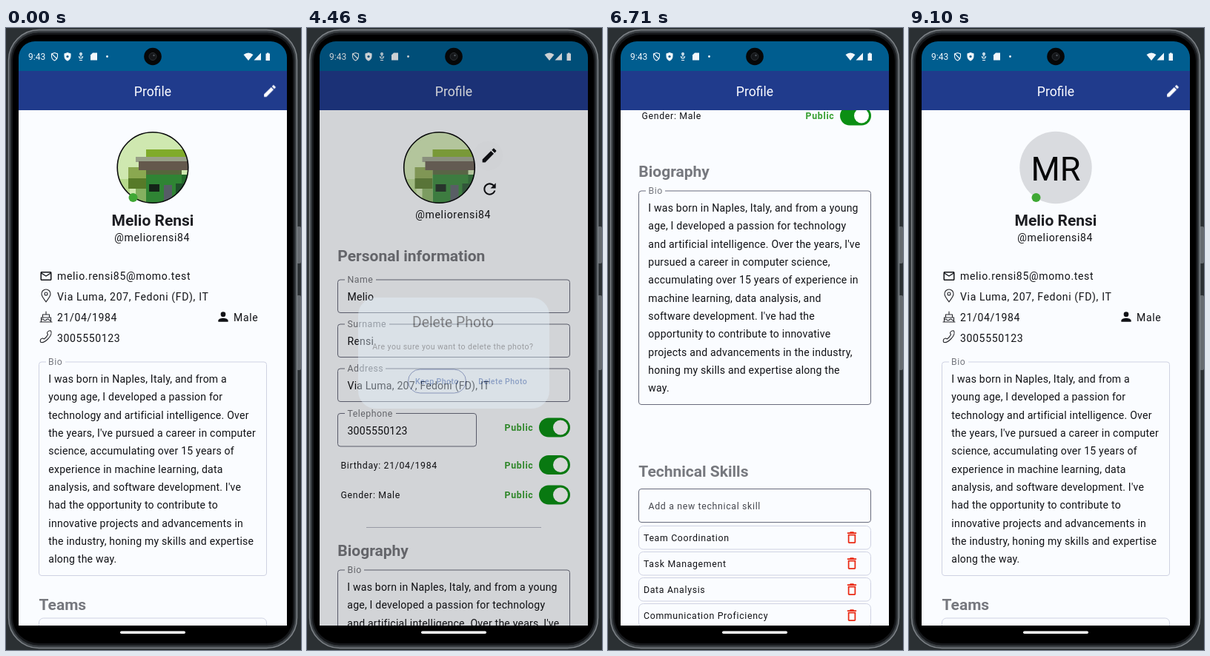
These frames come from a looping animation (398 px wide and 840 px high, 9140 ms). An HTML page:

```html
<!DOCTYPE html>
<html lang="en">
<head>
<meta charset="utf-8">
<title>Profile</title>
<style>
html, body { margin: 0; width: 398px; height: 840px; overflow: hidden; background: #2b3033; }
svg { display: block; }
text { font-family: Roboto, sans-serif; fill: #111216; white-space: pre; }
.info { font-size: 14.06px; letter-spacing: .64px; }
.body { font-size: 14.06px; letter-spacing: .22px; }
.small { font-size: 12.3px; letter-spacing: .68px; }
.label { font-size: 12.3px; letter-spacing: .5px; fill: #75777e; }
.state { font-size: 12.3px; letter-spacing: .72px; font-weight: 700; fill: #369f30; }
.head { font-size: 21px; font-weight: 700; fill: #76787e; }
.note { font-size: 10.55px; letter-spacing: .44px; }
.chip { font-size: 9.67px; letter-spacing: .43px; }
.mid { font-weight: 500; }
.hint { fill: #45474e; }
.line { fill: none; stroke: #686b7c; }
.pale { fill: none; stroke: #cfd2e2; }
</style>
</head>
<body>
<svg id="stage" width="398" height="840" viewBox="0 0 398 840"></svg>
<script>
const LOOP = 9140;
const PAPER = '#fafcff';
const NAVY = '#203b8c';
const RED = '#ea2a14';

const ICONS = {
  pencil: 'M3 17.25V21h3.75L17.81 9.94l-3.75-3.75L3 17.25zM20.71 7.04c.39-.39.39-1.02 0-1.41l-2.34-2.34c-.39-.39-1.02-.39-1.41 0l-1.83 1.83 3.75 3.75 1.83-1.83z',
  reset: 'M17.65 6.35C16.2 4.9 14.21 4 12 4c-4.42 0-7.99 3.58-7.99 8s3.57 8 7.99 8c3.73 0 6.84-2.55 7.73-6h-2.08c-.82 2.33-3.04 4-5.65 4-3.31 0-6-2.69-6-6s2.69-6 6-6c1.66 0 3.14.69 4.22 1.78L13 11h7V4z',
  bin: 'M6 19c0 1.1.9 2 2 2h8c1.1 0 2-.9 2-2V7H6v12zM8 9h8v10H8V9zM15.5 4l-1-1h-5l-1 1H5v2h14V4z',
  eye: 'M12 4.5C7 4.5 2.73 7.61 1 12c1.73 4.39 6 7.5 11 7.5s9.27-3.11 11-7.5c-1.73-4.39-6-7.5-11-7.5zM12 17a5 5 0 1 1 0-10 5 5 0 0 1 0 10zm0-8a3 3 0 1 0 0 6 3 3 0 0 0 0-6z',
  person: 'M12 12a4 4 0 1 0 0-8 4 4 0 0 0 0 8zm0 2c-2.67 0-8 1.34-8 4v2h16v-2c0-2.66-5.33-4-8-4z',
  mail: 'M22 6c0-1.1-.9-2-2-2H4c-1.1 0-2 .9-2 2v12c0 1.1.9 2 2 2h16c1.1 0 2-.9 2-2V6zm-2 0l-8 5-8-5h16zm0 12H4V8l8 5 8-5v10z'
};

const text = (x, y, cls, str, more = '') => `<text x="${x}" y="${y}" class="${cls}" ${more}>${str}</text>`;
const rect = (x, y, w, h, fill, r = 0, more = '') => `<rect x="${x}" y="${y}" width="${w}" height="${h}" rx="${r}" fill="${fill}" ${more}/>`;
const box = (x, y, w, h, cls, r) => `<rect x="${x}" y="${y}" width="${w}" height="${h}" rx="${r}" class="${cls}"/>`;
const dot = (x, y, r, fill, more = '') => `<circle cx="${x}" cy="${y}" r="${r}" fill="${fill}" ${more}/>`;
const icon = (name, cx, cy, size, fill = '#111216') =>
  `<path d="${ICONS[name]}" fill="${fill}" transform="translate(${cx - size / 2} ${cy - size / 2}) scale(${size / 24})"/>`;
const lines = (x, y, rows) => rows.map((row, i) => text(x, y + i * 24.33, 'body', row)).join('');

// Outlined field whose label sits on the top edge
const field = (y, label, gap, value, w = 314, cls = 'body') =>
  box(41.5, y, w - 1, 44.5, 'line', 3.5) + rect(51, y - 2, gap, 4, PAPER) +
  text(54.5, y + 4.3, 'label', label) + text(54.5, y + (cls === 'body' ? 28 : 26.5), cls, value);
const blank = (y, hint) => box(41.5, y, 313, 45, 'line', 3.5) + text(54.5, y + 27.5, 'small hint', hint);
const toggle = (y, label = 'Public') =>
  text(266.5, y + 4.7, 'state', label) + rect(313, y - 13, 42, 26, '#0b8f14', 13) + dot(342, y, 10, '#fff');
const skill = (y, name) =>
  box(41.5, y, 313, 31.5, 'pale', 6) + text(48, y + 20.5, 'small', name) + icon('bin', 329, y + 15.7, 21, RED);
const language = (y, name, level, chipX) =>
  box(41.5, y - 18, 313, 36, 'pale', 6) + text(48, y + 4.5, 'small', name) +
  rect(chipX + .5, y - 9.5, 309 - chipX, 19, '#dadcf2', 7, 'stroke="#4a4c58"') +
  text(chipX + 7, y + 3.5, 'chip', level) + icon('bin', 329, y, 21, RED);

const picture = (cx, fade) => `<g transform="translate(${cx - 198} 0)">
  <g clip-path="url(#round)" opacity="${fade}">` +
  rect(149, 140, 98, 98, '#cfe8b0') +
  rect(149, 204, 18, 34, '#b6d98c') +
  rect(189, 164, 58, 11, '#80ab2a') + rect(175, 174, 72, 7, '#98a088') +
  rect(165, 188, 24, 15, '#8aa850') + rect(165, 203, 24, 14, '#567a28') + rect(179, 180, 68, 12, '#64584c') +
  rect(189, 192, 48, 6, '#56663c') + rect(189, 198, 58, 40, '#2f8434') +
  rect(175, 217, 14, 21, '#84b060') + rect(237, 198, 10, 18, '#246a2c') +
  rect(193, 211, 14, 10, '#142418') + rect(213, 212, 11, 22, '#565c66') + rect(229, 210, 12, 14, '#20502c') +
  `</g><circle cx="198" cy="188.5" r="47.8" fill="none" stroke="#0a0b0d" stroke-width="1.6"/></g>`;
const monogram = (cx, ink) => dot(cx, 188.5, 48.7, '#d9dbdf') +
  text(cx, 206.3, '', 'MR', `text-anchor="middle" font-size="45" style="fill:${ink}"`);

const thin = d => `<path d="${d}" fill="none" stroke="#26272c" stroke-width="1.1" stroke-linejoin="round" stroke-linecap="round"/>`;

const view = `<g class="view">
  <g class="pic">${picture(198, 1)}</g><g class="mono">${monogram(198, '#060708')}</g>` +
  dot(171.5, 229, 6, '#3fa834') +
  text(198, 267, 'head', 'Melio Rensi', 'text-anchor="middle" style="fill:#1c1d22"') +
  text(146.3, 288, 'info', '@meliorensi84') +
  icon('mail', 54, 335, 18) +
  thin('M54 370c-3-5-6-7-6-11a6 6 0 0 1 12 0c0 4-3 6-6 11z') + thin('M52 359a2 2 0 1 1 4 0a2 2 0 1 1-4 0') +
  thin('M46 397h16M47.500 397v-6h13v6M49.500 391v-4h9v4M54 387v-4M47.500 394q2 -2 3.500 0t3.500 0t3.500 0t2.500 0') +
  thin('M46.500 424c-1-3 1-5 3-5l2 1c3-2 4-4 5-6l-1-2c0-2 3-4 5-3c2 4-1 8-4 11s-7 6-10 4z') +
  text(69, 340, 'info', 'melio.rensi85@momo.test') +
  text(69, 368, 'info', 'Via Luma, 207, Fedoni (FD), IT') +
  text(69, 396, 'info', '21/04/1984') + icon('person', 293, 390, 20) + text(307, 396, 'info', 'Male') +
  text(69, 423.5, 'info', '3005550123') +
  box(44.5, 451, 307, 288.5, 'pale', 3.5) + rect(54, 449, 26, 4, PAPER) + text(57, 455.3, 'label', 'Bio') +
  lines(57.3, 479, [
    'I was born in Naples, Italy, and from a', 'young age, I developed a passion for',
    'technology and artificial intelligence. Over', "the years, I've pursued a career in computer",
    'science, accumulating over 15 years of', 'experience in machine learning, data',
    "analysis, and software development. I've", 'had the opportunity to contribute to',
    'innovative projects and advancements in', 'the industry, honing my skills and expertise',
    'along the way.']) +
  text(44.5, 786, 'head', 'Teams') + box(44.5, 797, 307, 60, 'pale', 6) + '</g>';

const languages = [
  [95, 'Italian', 'Native (C2)', 238], [134, 'English', 'Upper-Intermediate (B2)', 183],
  [173, 'French', 'Elementary (A2)', 221], [212, 'German', 'Upper-Intermediate (B2)', 183],
  [251, 'Spanish', 'Upper-Intermediate (B2)', 183]];
const skills = ['Team Coordination', 'Task Management', 'Data Analysis', 'Communication Proficiency', 'Machine Learning'];

const edit = `<g class="edit"><g id="scroll">
  <g class="pic">${picture(178.5, .88)}` + dot(244.5, 172.5, 20, '#000', 'id="tapPhoto"') +
  icon('pencil', 246, 172, 25) + icon('reset', 246.5, 217.5, 24.5) + '</g>' +
  `<g class="mono">${monogram(178.5, '#b4b6ba')}${icon('pencil', 246, 217.5, 25)}</g>` +
  text(146.3, 257, 'info', '@meliorensi84') +
  text(41.3, 315, 'head', 'Personal information') +
  field(340, 'Name', 42, 'Melio') + field(400, 'Surname', 60, 'Rensi') +
  field(460, 'Address', 55, 'Via Luma, 207, Fedoni (FD), IT') +
  field(520.5, 'Telephone', 69, '3005550123', 188) + toggle(539.5) +
  text(45.5, 595, 'small', 'Birthday: 21/04/1984') + toggle(590) +
  text(45.5, 635.3, 'small', 'Gender: Male') + toggle(630.5) +
  rect(80, 674, 236, 1, '#b4b7c4', 0, 'id="rule"') +
  text(41.3, 713, 'head', 'Biography') +
  box(41.5, 732, 313, 288.5, 'line', 3.5) + rect(51, 730, 26, 4, PAPER) + text(54.5, 736.3, 'label', 'Bio') +
  lines(54.3, 760, [
    'I was born in Naples, Italy, and from a young', 'age, I developed a passion for technology',
    "and artificial intelligence. Over the years, I've", 'pursued a career in computer science,',
    'accumulating over 15 years of experience in', 'machine learning, data analysis, and',
    "software development. I've had the", 'opportunity to contribute to innovative',
    'projects and advancements in the industry,', 'honing my skills and expertise along the', 'way.']) +
  text(41.3, 1118, 'head', 'Technical Skills') + blank(1134.5, 'Add a new technical skill') +
  skills.map((name, i) => skill(1184.5 + 35 * i, name)).join('') +
  '<g transform="translate(0 1446)">' +
  text(41.3, 10, 'head', 'Languages') + blank(27, 'Add a new language') +
  languages.map(row => language(...row)).join('') +
  rect(80, 311, 236, 1, '#d3d5de') +
  text(41.3, 366, 'head', 'Account') +
  field(391, 'Mail', 33, 'melio.rensi85@momo.test', 188, 'note') + toggle(410) +
  ['Old', 'New', 'Repeat'].map((word, i) =>
    blank(450.5 + 60.2 * i, word + ' password') + icon('eye', 335.5, 473.3 + 60.2 * i, 16.5, '#3a3c44')).join('') +
  text(45.5, 656, 'small', 'Status') + toggle(651.3, 'Online') +
  rect(122.5, 724.5, 74, 31.5, 'none', 15.7, `stroke="${NAVY}"`) + text(141.5, 744.5, 'note mid', 'Cancel') +
  rect(209.5, 724, 64.5, 32, NAVY, 16) + rect(209.5, 724, 64.5, 32, '#fff', 16, 'id="tapSave"') +
  text(229, 744.5, 'note mid', 'Save', 'style="fill:#fff"') +
  '</g></g></g>';

const shield = 'M65.500 33.500l4 1.500v3c0 3-2 5-4 6c-2-1-4-3-4-6v-3z';
const SKY = '#005d8f';
const status = text(30, 43, '', '9:43', 'font-size="12" style="fill:#f2f7fb"') +
  `<g stroke="#f2f7fb" stroke-width="1.1" fill="none"><path d="${shield}M62 35l7 7"/>
  <path d="${shield}" transform="translate(17.5 0)" fill="#f2f7fb"/>
  <path d="M101 34v5M98.500 38q0 3 2.500 3t2.500-3M99 43.500h4"/><circle cx="101" cy="35" r="1.4"/></g>` +
  dot(83, 38.5, 1.6, SKY) +
  '<path d="M117 33.500h6v10h-9v-7z" fill="#f2f7fb"/>' + dot(136.5, 38.5, 1.4, '#f2f7fb') +
  '<path d="M320.500 36q6.500-5 13 0l-6.500 8zM344 33.500v10h-9.500zM350.500 34.500h1.500v-1h2.500v1h1.500v9.500h-5.500z" fill="#f2f7fb"/>';

const BLUE = '#2450a8';
const dialog = '<g id="dialog">' + rect(69, 364, 258, 150, '#e2f1fd', 24) +
  text(142, 404, '', 'Delete Photo', 'font-size="19.3"') +
  text(88.3, 434, 'note hint', 'Are you sure you want to delete the photo?') +
  rect(136.5, 461, 78, 32, 'none', 16, `stroke="${NAVY}"`) +
  rect(222, 461, 85, 32, BLUE, 16, 'id="tapDelete"') +
  ['Keep', 'Delete'].map((word, i) => text(146 + 85.3 * i, 481, 'note mid', word + ' Photo', `style="fill:${BLUE}"`)).join('') + '</g>';

stage.innerHTML = `<defs>
  <clipPath id="round"><circle cx="198" cy="188.5" r="48"/></clipPath>
  <clipPath id="page"><rect x="17" y="111" width="362" height="696"/></clipPath>
  <clipPath id="screen"><path d="M17 807V40a22 22 0 0 1 22-22H357a22 22 0 0 1 22 22V807z"/></clipPath></defs>` +
  rect(392, 268, 6, 50, '#666b70', 2) + rect(392, 361, 6, 101, '#666b70', 2) +
  rect(3.5, 2.5, 389, 835, '#3d4246', 41, 'stroke="#7d8287" stroke-width="1.5"') +
  rect(6.5, 6, 383, 828, '#15171a', 37, 'stroke="#2c3034"') + rect(9, 9, 378, 822, '#000', 35) +
  '<g clip-path="url(#screen)">' +
  rect(17, 18, 362, 41, SKY) + rect(17, 58, 362, 53, NAVY) + rect(17, 111, 362, 696, PAPER) + status +
  text(198, 92, '', 'Profile', 'text-anchor="middle" font-size="17.6" style="fill:#fafbff"') +
  dot(356, 85, 18, '#fff', 'id="tapEdit"') + `<g class="view">${icon('pencil', 356, 85, 21, '#fff')}</g>` +
  `<g clip-path="url(#page)">${view}${edit}</g>` +
  rect(17, 18, 362, 789, '#000', 0, 'id="scrim"') + dialog + '</g>' +
  dot(198, 38.5, 11.8, '#060708') + dot(198, 38.5, 5, '#15171a', 'stroke="#2c3034"') + dot(199.5, 37, 1.2, '#50565c') +
  rect(154, 814.5, 88, 3.4, '#fff', 1.7);

// Each stop is [ms, value, easing to the next stop]
let css = '';
let count = 0;
function key(sel, prop, stops) {
  const name = 'k' + count++;
  const all = [[0, stops[0][1]], ...stops, [LOOP, stops[stops.length - 1][1]]];
  css += `@keyframes ${name}{` + all.map(([ms, value, ease = 'linear']) =>
    `${(ms / LOOP * 100).toFixed(3)}%{${prop}:${value};animation-timing-function:${ease}}`).join('') + '}' +
    `${sel}{animation:${name} ${LOOP}ms linear infinite}`;
}
const STD = 'cubic-bezier(.4,0,.2,1)';
const FLING = 'cubic-bezier(.3,.2,.3,1)';
const fade = (a, b) => [[200, a, STD], [900, b], [8370, b, STD], [9070, a]];
const up = px => `translateY(${-px}px)`;

key('.view', 'opacity', fade(1, 0));
key('.edit', 'opacity', fade(0, 1));
key('.pic', 'opacity', [[5599, 1], [5600, 0]]);
key('.mono', 'opacity', [[5599, 0], [5600, 1]]);
key('#tapEdit', 'opacity', [[50, 0], [150, .16], [250, .16], [450, 0]]);
key('#tapPhoto', 'opacity', [[3770, 0], [4000, .1], [4370, .1], [4470, 0]]);
key('#tapDelete', 'opacity', [[5380, 0], [5460, .12], [5700, 0]]);
key('#tapSave', 'opacity', [[8140, 0], [8230, .16], [8370, .16], [8600, 0]]);
key('#dialog', 'opacity', [[4370, 0], [4590, 1], [5500, 1], [5700, 0]]);
key('#scrim', 'opacity', [[4370, 0], [4590, .38], [5500, .38], [5700, 0]]);
key('#rule', 'opacity', [[6300, 1], [6500, 0]]);
key('#scroll', 'transform', [
  [6300, up(0), FLING], [6690, up(512)], [6750, up(512), FLING],
  [7170, up(864)], [7220, up(864), FLING], [7620, up(1446)]]);

document.head.appendChild(document.createElement('style')).textContent = css;
</script>
</body>
</html>
```
